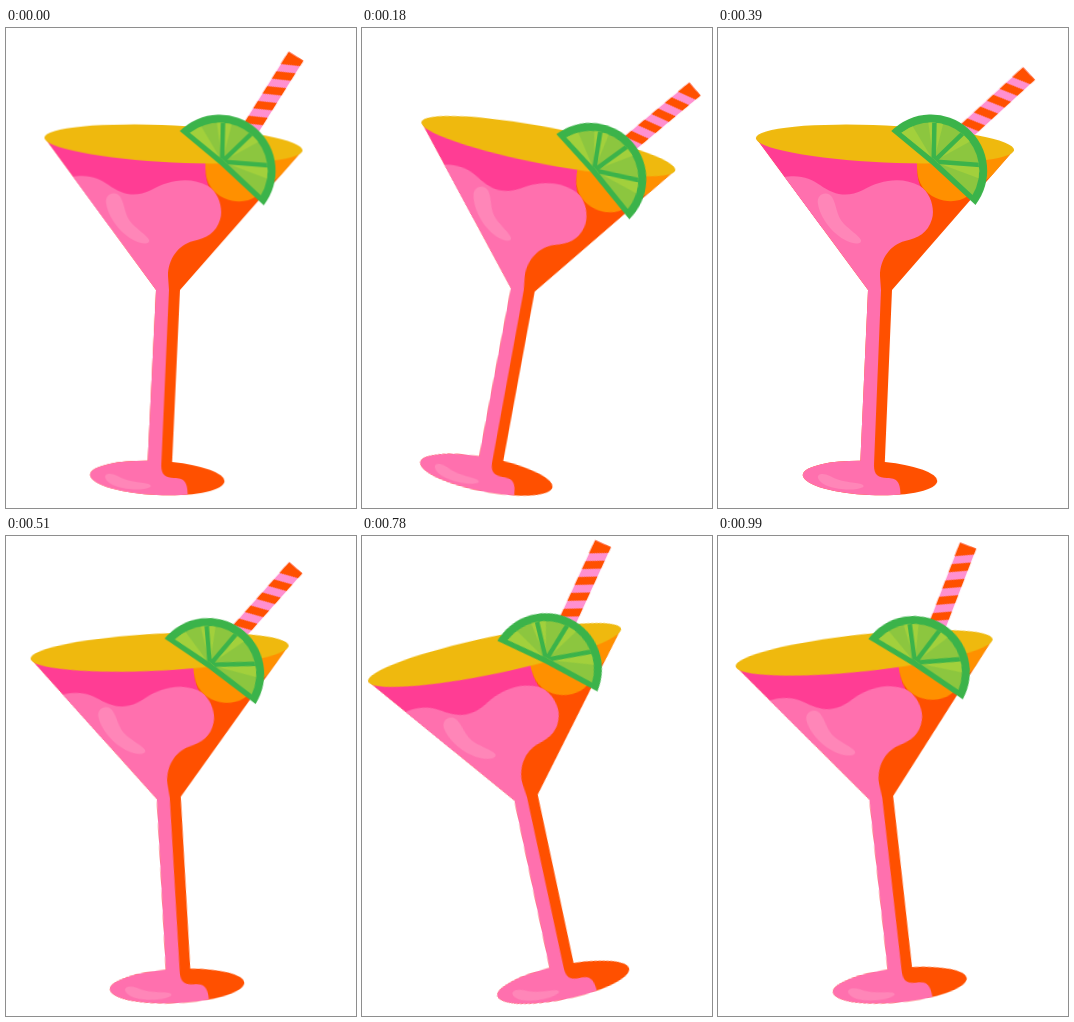
Write an HTML page without scripts that moves like this. It is 350 px wide and 480 px high and loops after 1020 ms.

```html
<!DOCTYPE html>
<html lang="en">
<head>
<meta charset="utf-8">
<title>Swaying cocktail</title>
<style>
  html, body { margin: 0; width: 100%; height: 100%; overflow: hidden; background: #fff; }
  svg { display: block; width: 100%; height: 100%; }

  .sway { transform-origin: 161.5px 253.5px; animation: sway 1020ms infinite; }
  .straw { transform-origin: 235px 116px; animation: lag 1020ms infinite; }

  /* slow swing left, quick recovery, cut back to the start */
  @keyframes sway {
    0% { transform: rotate(0deg); animation-timing-function: cubic-bezier(.3, .6, .6, 1); }
    8.82% { transform: rotate(9.34deg); animation-timing-function: cubic-bezier(.28, 0, .64, 1); }
    84.31% { transform: rotate(-15.05deg); animation-timing-function: cubic-bezier(.35, 0, .75, .6); }
    97.06%, 100% { transform: rotate(-8.7deg); }
  }
  /* the straw trails behind the glass */
  @keyframes lag {
    0% { transform: rotate(0deg); animation-timing-function: cubic-bezier(.333, .667, .667, 1); }
    44.12% { transform: rotate(16deg); animation-timing-function: cubic-bezier(.35, .05, .67, .57); }
    97.06%, 100% { transform: rotate(-2deg); }
  }

  .red { fill: #ff5000; }
  .pink { fill: #ff70ae; }
  .deep { fill: #ff3d94; }
  .shine { fill: #ff86b8; }
  .orange { fill: #ff9000; }
  .yellow { fill: #efb90e; }
  .peel { fill: #3bb34a; }
  .pulp { fill: #8cc63f; }
  .zest { fill: #a2d03c; }
  .rib { fill: none; stroke: #3bb34a; stroke-width: 4.5; }
</style>
</head>
<body>
<svg viewBox="0 0 350 480">
  <defs>
    <pattern id="stripes" width="40" height="17.5" x="-20" y="-84.9" patternUnits="userSpaceOnUse" patternTransform="skewY(-26)">
      <rect class="red" width="40" height="8.8"/>
    </pattern>
    <clipPath id="glass">
      <path d="M38 110L150 262L142.300 434L139 440H173L166.800 434L174 262L296 122Q170 90 38 110Z"/>
      <ellipse cx="152" cy="450" rx="67.300" ry="17" transform="rotate(2.66 152 450)"/>
    </clipPath>
    <clipPath id="flesh">
      <path d="M-47.200 -5.500A48 48 0 0 1 47.200 -5.500L-4 -7Z"/>
    </clipPath>
  </defs>

  <g class="sway">
    <g class="straw">
      <g transform="translate(235 116) rotate(31.8)">
        <rect x="-9.200" y="-103.500" width="17.300" height="103.500" fill="#ff90d0"/>
        <rect x="-9.200" y="-103.500" width="17.300" height="103.500" fill="url(#stripes)"/>
        <path class="red" d="M-9.200 -103.500H8.100V-97.500L-9.200 -89.100Z"/>
      </g>
    </g>

    <g clip-path="url(#glass)">
      <rect class="red" width="350" height="480"/>
      <path class="orange" d="M199 115V140C199 155 207 165 218 170C230 175 241 174 250 168C260 160 266 152 276 147L310 120Z"/>
      <path class="deep" d="M30 105H199V140Q199 152 204 162L180 200H60Z"/>
      <path class="pink" d="M50 153C78 144 90 149 102 157C116 167 129 170 145 162C162 152 184 148 202 158
        C213 165 217 181 214 191C210 205 200 210 187 213C172 217 162 231 162 248L163 262L156 436
        C155.500 447 160 450 169 450C179 450 183 454 182.500 470H60V262Z"/>
      <path class="shine" d="M100 176C98 166 109 162 114 169C119 177 118 188 126 196C132 202 140 207 143 212
        C144 217 135 216 129 213C114 206 102 189 100 176Z"/>
      <path class="shine" d="M100 450C99 445 106 445 112 448C122 454 134 454 143 456C148 458 145 460 139 461
        C124 463 103 459 100 450Z"/>
    </g>

    <ellipse class="yellow" cx="167" cy="116" rx="129.200" ry="18.500" transform="rotate(2.66 167 116)"/>

    <g transform="translate(215.4 140) rotate(41.2)">
      <path class="peel" d="M-56 0A56.110 56.110 0 0 1 56 0L-4 -1.500Z"/>
      <g clip-path="url(#flesh)">
        <rect class="pulp" x="-50" y="-55" width="100" height="55"/>
        <path class="zest" d="M-4 -5L-50 -5V-20ZM-4 -5L-42 -38L-27 -50ZM-4 -5L0 -55H14ZM-4 -5L38 -38L46 -24Z"/>
        <path class="rib" d="M-4 -5L-36 -43M-4 -5L0 -53M-4 -5L41 -39"/>
      </g>
    </g>
  </g>
</svg>
</body>
</html>
```
